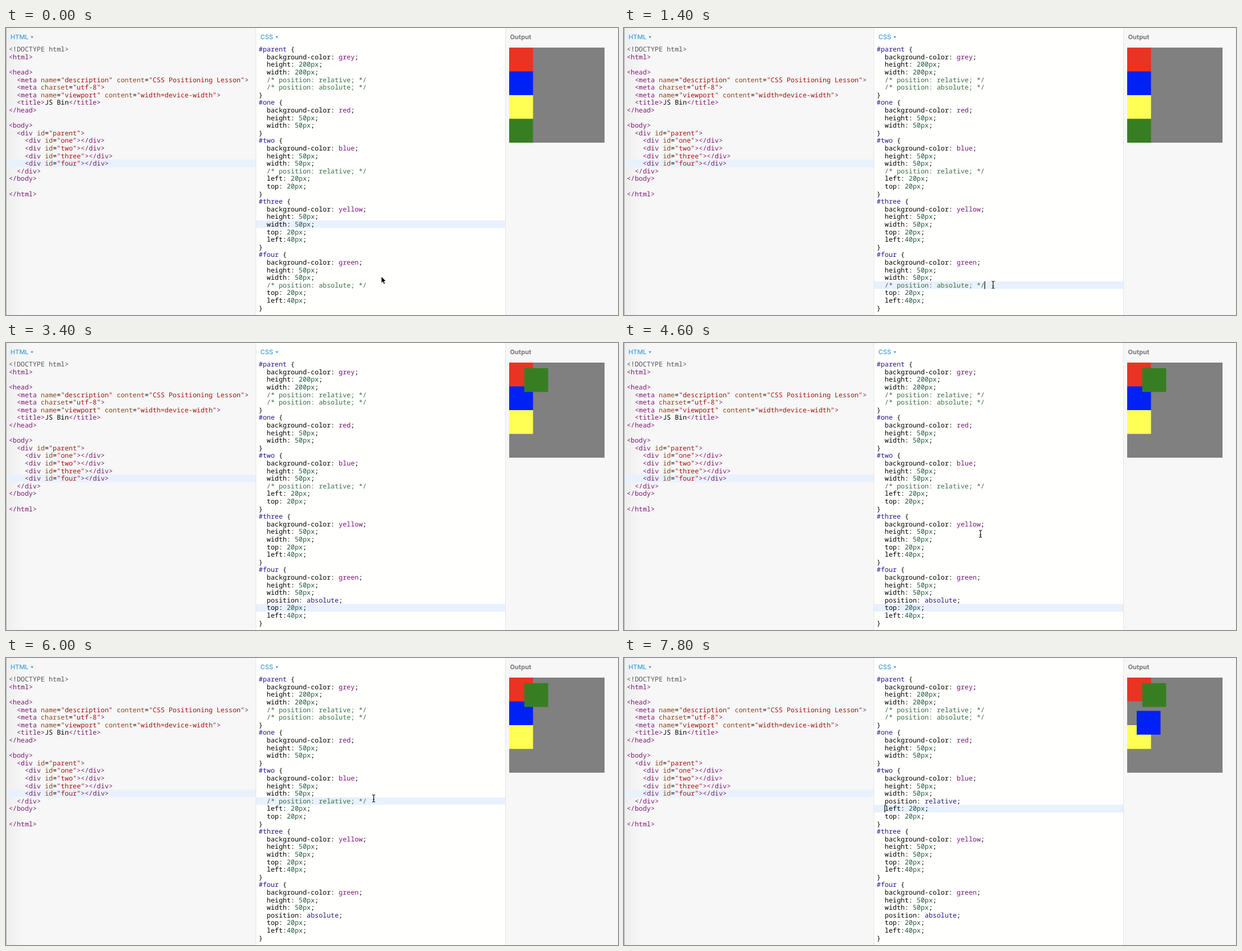
An HTML page for the animation above (8 s loop, 1091x513 px).

```html
<!DOCTYPE html>
<html lang="en">
<head>
<meta charset="utf-8">
<title>CSS positioning</title>
<style>
  html, body { margin: 0; width: 100%; height: 100%; overflow: hidden; background: #f7f7f7; }
  svg { display: block; width: 1091px; height: 513px; }
  text { white-space: pre; text-rendering: geometricPrecision; }
  .code { font-family: "Noto Sans Mono", "Liberation Mono", monospace; font-size: 11.88px; }
  .head { font-family: Inter, sans-serif; font-size: 11.2px; font-weight: 500; fill: #3d9fd8; }
  .meta { fill: #555; }
  .string { fill: #a11; }
  .tag { fill: #7b1b70; }
  .attr { fill: #8f4420; }
  .comment { fill: #3a6e45; }
  .id { fill: #2a1190; }
  .number { fill: #235843; }
  .color { fill: #7a1479; }
  .atom { fill: #201a8c; }
</style>
</head>
<body>
<svg viewBox="0 0 1091 513">
  <defs>
    <linearGradient id="shade">
      <stop offset="0" stop-color="#000" stop-opacity=".035"/>
      <stop offset="1" stop-color="#000" stop-opacity="0"/>
    </linearGradient>
  </defs>
  <rect width="1091" height="513" fill="#f7f7f7"/>
  <rect width="34" height="513" fill="url(#shade)"/>
  <rect x="445" width="445" height="513" fill="#fffffd"/>
  <rect x="1" y="235.2" width="444" height="13.6" fill="#e9f1fc"/>
  <rect id="line" x="445" width="445" height="13.6" fill="#e8f1fd"/>
  <path d="M445.5 0V513M890.5 0V513" stroke="#e6e6e6"/>
  <path d="M.5 0V513" stroke="#a9a9a9"/>

  <g class="head">
    <text x="8" y="20">HTML</text>
    <text x="453.5" y="20">CSS</text>
    <path d="M44 14.8h4.8l-2.4 3.8zM480.5 14.8h4.8l-2.4 3.8z"/>
    <text x="898.5" y="20" fill="#777" font-weight="700">Output</text>
  </g>

  <g id="html" class="code"></g>
  <g id="css" class="code"></g>
  <path id="caret" d="M0 0v13.6" stroke="#000" stroke-width="1.2"/>

  <rect x="897" y="35" width="170" height="170" fill="#808080"/>
  <rect x="897" y="35" width="42.5" height="42.5" fill="#ea3323"/>
  <rect x="897" y="120" width="42.5" height="42.5" fill="#ffff54"/>
  <rect id="two" width="42.5" height="42.5" fill="#0021f5"/>
  <rect id="four" width="42.5" height="42.5" fill="#377e22"/>

  <path id="arrow" d="M0 0V12L2.8 9.5L4.7 14L6.9 13.1L5 8.8H8.6Z" fill="#000" stroke="#fff" stroke-width=".9"/>
  <g id="beam" fill="none">
    <path d="M-2.6 -6.5Q0 -6.3 0 -4.6Q0 -6.3 2.6 -6.5M0 -5V5M-2.6 6.5Q0 6.3 0 4.6Q0 6.3 2.6 6.5M-1.6 2h3.2" stroke="#fff" stroke-width="2.4" stroke-opacity=".7"/>
    <path d="M-2.6 -6.5Q0 -6.3 0 -4.6Q0 -6.3 2.6 -6.5M0 -5V5M-2.6 6.5Q0 6.3 0 4.6Q0 6.3 2.6 6.5M-1.6 2h3.2" stroke="#111" stroke-width="1.2"/>
  </g>
</svg>

<script>
const LOOP = 8000, STEP = 200, ROW = 13.6, COL = 7.13, TOP = 31.2, CSS_X = 450.6;
const $ = id => document.getElementById(id);
const SVG = "http://www.w3.org/2000/svg";

const htmlCode = `<!DOCTYPE html>
<html>

<head>
  <meta name="description" content="CSS Positioning Lesson">
  <meta charset="utf-8">
  <meta name="viewport" content="width=device-width">
  <title>JS Bin</title>
</head>

<body>
  <div id="parent">
    <div id="one"></div>
    <div id="two"></div>
    <div id="three"></div>
    <div id="four"></div>
  </div>
</body>

</html>`;

const cssCode = `#parent {
  background-color: grey;
  height: 200px;
  width: 200px;
  /* position: relative; */
  /* position: absolute; */
}
#one {
  background-color: red;
  height: 50px;
  width: 50px;
}
#two {
  background-color: blue;
  height: 50px;
  width: 50px;
  /* position: relative; */
  left: 20px;
  top: 20px;
}
#three {
  background-color: yellow;
  height: 50px;
  width: 50px;
  top: 20px;
  left:40px;
}
#four {
  background-color: green;
  height: 50px;
  width: 50px;
  /* position: absolute; */
  top: 20px;
  left:40px;
}`;

const htmlRule = /(?<meta><!DOCTYPE html>)|(?<string>"[^"]*")|(?<tag><\/?\w+|>)|(?<attr>\w+(?==))/g;
const cssRule = /(?<comment>\/\*.*\*\/)|(?<id>#\w+)|(?<number>\d+px)|(?<color>\b(?:grey|red|blue|yellow|green)\b)|(?<atom>\b(?:absolute|relative)\b)/g;

function addSpan(line, text, kind) {
  if (!text) return;
  const span = document.createElementNS(SVG, "tspan");
  if (kind) span.setAttribute("class", kind);
  span.textContent = text;
  line.append(span);
}

function paint(line, text, rule) {
  line.replaceChildren();
  let end = 0;
  for (const match of text.matchAll(rule)) {
    addSpan(line, text.slice(end, match.index));
    addSpan(line, match[0], Object.keys(match.groups).find(k => match.groups[k]));
    end = match.index + match[0].length;
  }
  addSpan(line, text.slice(end));
}

function addCode(group, code, left, rule) {
  return code.split("\n").map((raw, row) => {
    const text = raw.trimStart();
    const line = document.createElementNS(SVG, "text");
    line.setAttribute("x", left + (raw.length - text.length) * COL);
    line.setAttribute("y", TOP + row * ROW + 10.9);
    paint(line, text, rule);
    group.append(line);
    return line;
  });
}

addCode($("html"), htmlCode, 5, htmlRule);
const cssLines = addCode($("css"), cssCode, CSS_X, cssRule);

const toggles = [
  { row: 31, value: "absolute", at: 2500 },
  { row: 16, value: "relative", at: 7400 }
];
const carets = [
  { at: -600, row: 23, col: 14 },
  { at: 1200, row: 31, col: 27 },
  { at: 2500, row: 32, col: 2 },
  { at: 5300, row: 16, col: 27 },
  { at: 7400, row: 17, col: 2 }
];
const mouse = [
  [0, 669, 444], [200, 669, 444], [1000, 658, 459], [3600, 658, 459],
  [4600, 635.5, 341], [5200, 655.5, 251], [LOOP, 655.5, 251]
];

const place = (id, x, y) => $(id).setAttribute("transform", `translate(${x} ${y})`);
const show = (id, on) => $(id).setAttribute("visibility", on ? "visible" : "hidden");

function mouseAt(t) {
  const i = mouse.findIndex(p => p[0] > t);
  const [t0, x0, y0] = mouse[i - 1], [t1, x1, y1] = mouse[i];
  const k = (t - t0) / (t1 - t0), ease = k * k * (3 - 2 * k);
  return [x0 + (x1 - x0) * ease, y0 + (y1 - y0) * ease];
}

function draw(t) {
  for (const { row, value, at } of toggles) {
    const rule = `position: ${value};`;
    paint(cssLines[row], t < at ? `/* ${rule} */` : rule, cssRule);
  }

  const caret = carets.findLast(c => c.at <= t);
  const y = TOP + caret.row * ROW;
  $("line").setAttribute("y", y);
  place("caret", CSS_X + caret.col * COL, y);
  show("caret", (t - caret.at) % 1060 < 530);

  if (t < 2800) place("four", 897, 162.5);
  else place("four", 924, 45);
  if (t < 7800) place("two", 897, 77.5);
  else place("two", 914, 94.5);

  const [mx, my] = mouseAt(t);
  const typing = t >= 2500 && t < 3600 || t >= 7400;
  place("arrow", mx, my);
  place("beam", mx, my);
  show("arrow", t < 400);
  show("beam", t >= 400 && !typing);
}

let last = -1;
const start = performance.now();
function tick() {
  const t = Math.floor((performance.now() - start) % LOOP / STEP) * STEP;
  if (t !== last) draw(last = t);
  requestAnimationFrame(tick);
}
tick();
</script>
</body>
</html>
```
